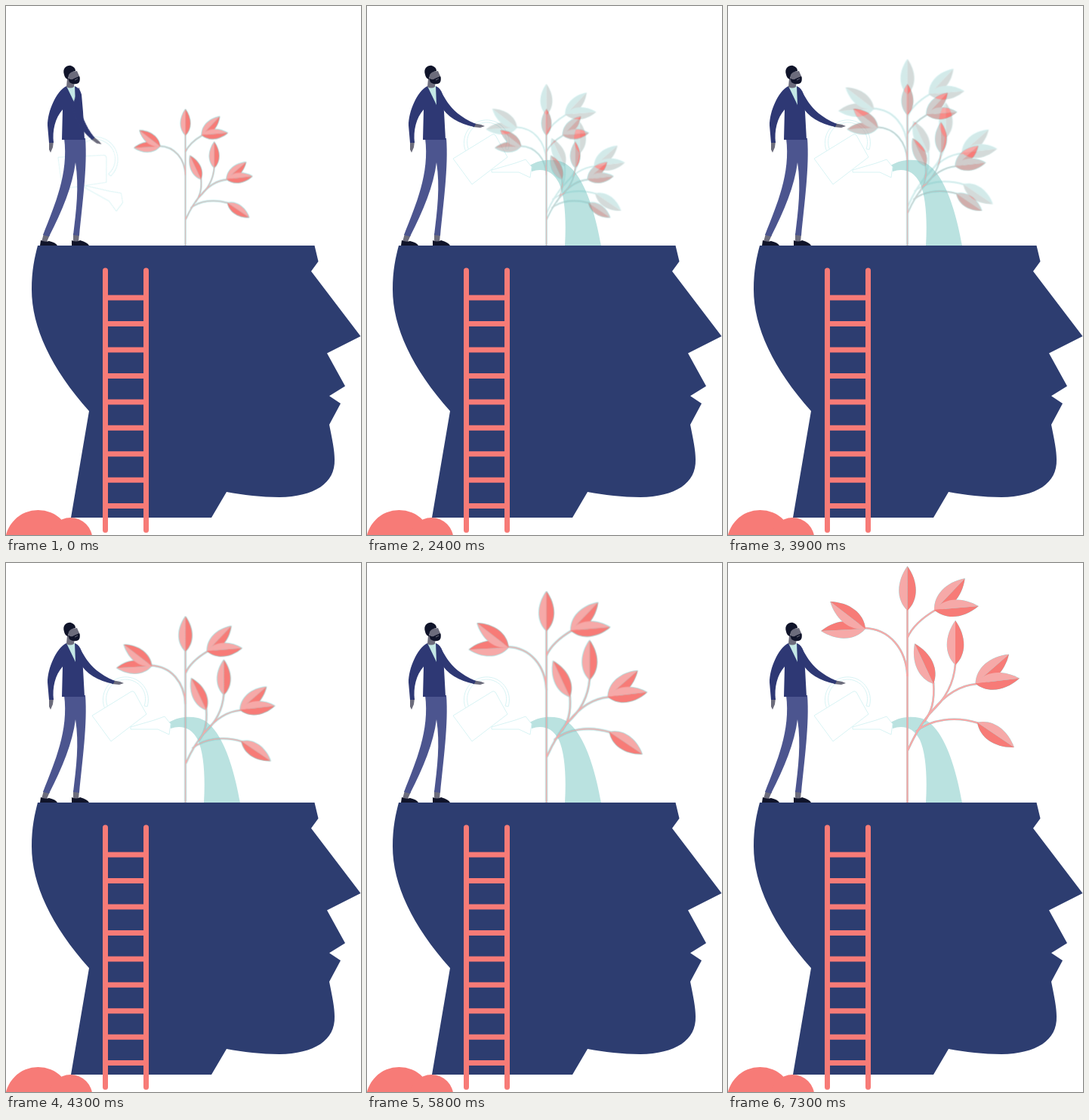
Write an HTML page that moves like this. It is 470 px wide and 700 px high and loops after 8000 ms.

```html
<!DOCTYPE html>
<html lang="en">
<head>
<meta charset="utf-8">
<title>Growing mind</title>
<style>
  :root { --navy: #2d3d70; --coral: #f77b77; --pink: #f6a9a8; --skin: #6c6c7c; --ink: #10142a; }
  html, body { margin: 0; width: 100%; height: 100%; overflow: hidden; background: #fff; }
  svg { display: block; width: 470px; height: 700px; }

  .pour { transform-origin: 95px 114px; animation: pour 8s steps(2, start) infinite; }
  .water { fill: #bae2e0; animation: water 8s step-end infinite; }
  .can { fill: #fff; stroke: #d8f3f4; stroke-width: 1; stroke-linejoin: round; }
  .branch { fill: none; stroke: var(--pink); stroke-width: 2.6; }

  /* Each tree size dissolves into the next in six steps */
  .trees { isolation: isolate; filter: url(#ash); }
  .trees use {
    transform-origin: 237.5px 334px;
    transform: scale(var(--s));
    mix-blend-mode: plus-lighter;
    animation: var(--fade) 8s steps(6, start) infinite;
  }
  .t1 { --s: .6; --fade: size1; }
  .t2 { --s: .7; --fade: size2; }
  .t3 { --s: .8; --fade: size3; }
  .t4 { --s: .9; --fade: size4; }
  .t5 { --s: 1; --fade: size5; }

  @keyframes pour { 0%, 6.25% { transform: rotate(29deg); } 8.75%, 100% { transform: rotate(0deg); } }
  @keyframes water { 0% { opacity: 0; } 16.25%, 100% { opacity: 1; } }
  @keyframes size1 { 0%, 28.75% { opacity: 1; } 36.25%, 100% { opacity: 0; } }
  @keyframes size2 { 0%, 28.75% { opacity: 0; } 36.25%, 47.5% { opacity: 1; } 55%, 100% { opacity: 0; } }
  @keyframes size3 { 0%, 47.5% { opacity: 0; } 55%, 66.25% { opacity: 1; } 73.75%, 100% { opacity: 0; } }
  @keyframes size4 { 0%, 66.25% { opacity: 0; } 73.75%, 85% { opacity: 1; } 92.5%, 100% { opacity: 0; } }
  @keyframes size5 { 0%, 85% { opacity: 0; } 92.5%, 100% { opacity: 1; } }
</style>
</head>
<body>
<svg viewBox="0 0 470 700">
  <defs>
    <!-- Half-transparent parts turn grey, solid parts keep their colour -->
    <filter id="ash" filterUnits="userSpaceOnUse" x="0" y="0" width="470" height="340" color-interpolation-filters="sRGB">
      <feColorMatrix values="1 0 0 .72 -.72  0 1 0 -.13 .13  0 0 1 -.13 .13  0 0 0 1 0"/>
    </filter>
    <g id="leaf">
      <path fill="#f6a9a8" d="M0 0C14-15 38-15 59 0Z"/>
      <path fill="#f77b77" d="M0 0C14 15 38 15 59 0Z"/>
    </g>
    <g id="tree">
      <g class="branch">
        <path d="M237.5 60V334"/>
        <path d="M237.5 150C236 114 214 87 180 86"/>
        <path d="M237.5 99C244 84 258 72 275 62"/>
        <path d="M238 248C247 228 256 211 270 196C286 176 305 162 329 160"/>
        <path d="M249 223C268 207 300 202 332 212"/>
        <path d="M272 158C274 184 269 197 260 210"/>
        <path d="M301 134C299 160 286 182 268 198"/>
      </g>
      <use href="#leaf" transform="translate(237.5 63) rotate(-90)"/>
      <use href="#leaf" transform="translate(273 63) rotate(-46.4)"/>
      <use href="#leaf" transform="translate(273 62) rotate(-4.8)"/>
      <use href="#leaf" transform="translate(182 87) rotate(177)"/>
      <use href="#leaf" transform="translate(182 87) rotate(-142.5)"/>
      <use href="#leaf" transform="translate(272 160) rotate(-115)"/>
      <use href="#leaf" transform="translate(301 135) rotate(-90)"/>
      <use href="#leaf" transform="translate(327.5 159.5) rotate(-41)"/>
      <use href="#leaf" transform="translate(327.5 159.5) rotate(-6.7)"/>
      <use href="#leaf" transform="translate(330 211) rotate(34)"/>
    </g>
  </defs>

  <path class="water" d="M215 211C227 204 241 202 254 205C285 212 302 272 310 317H262C264 282 262 252 254 234C246 218 232 214 218 219Z"/>

  <g class="can pour">
    <path d="M131 193A30 30 0 1 1 187 190L183 189A26 26 0 1 0 135 191Z"/>
    <path d="M165 217L196 208L210 203L218 213L216 227L201 220L165 220Z"/>
    <path d="M114 202L166 170Q168 169 170 171L186 200L139 236Z"/>
  </g>

  <g class="trees">
    <use class="t1" href="#tree"/>
    <use class="t2" href="#tree"/>
    <use class="t3" href="#tree"/>
    <use class="t4" href="#tree"/>
    <use class="t5" href="#tree"/>
  </g>

  <!-- Gardener -->
  <g>
    <path fill="var(--skin)" d="M50 301L47 312H54L58 303ZM89 301V312H96L97 302Z"/>
    <path fill="var(--ink)" d="M46 310Q52 313 57 311Q66 313 68 317H45ZM87 310Q93 313 98 310Q108 313 110 317H87Z"/>
    <path fill="#4c558f" d="M77 175H105C108 212 101 262 97 304L89 303C93 270 97 240 92 207C88 238 75 270 57 305L49 303C65 262 83 222 77 175Z"/>
    <path fill="var(--skin)" d="M57 179H63L62 187L59 194L57 190Z"/>
    <path fill="#2e3874" d="M80 106C66 113 55 140 55 158L57 181H63C61 165 65 148 75 137L74 177H104L102 140L100 117Q98 109 91 106Z"/>
    <path fill="#c4e8e6" d="M80 106L91 106L92 131Z"/>
    <path fill="var(--skin)" d="M81 96H91L90 107Q85 110 80 107Z"/>
    <path fill="var(--skin)" d="M81 88L94 86L98 95L94 102L84 100Z"/>
    <path fill="var(--ink)" d="M77 91C74 82 81 78 86 79Q92 81 92 86Q85 87 83 91L82 97Q78 96 77 91Z"/>
    <path fill="var(--ink)" d="M82 95Q86 99 90 96L97 93Q99 99 96 102Q90 105 84 101Z"/>
    <path fill="none" stroke="var(--skin)" d="M91 98L95 96"/>
  </g>
  <g class="pour">
    <path fill="var(--skin)" d="M140 155L151 157L156 159L150 161L140 160Z"/>
    <path fill="#2e3874" d="M93 108C102 112 103 139 144 156L142 160C122 156 106 147 97 131Z"/>
  </g>

  <!-- Head, ladder and bush -->
  <path fill="var(--navy)" d="M42 317H408.5L413.5 338L404 351L469.5 437L425 459.5L449 503L428 516L443 526L428 554C432 574 435 588 435 600C436 632 408 649 362 650C338 650 314 647 292 643L272 677H86L110 536C60 480 34 425 34 375C34 350 38 332 42 317Z"/>
  <g fill="none" stroke="var(--coral)" stroke-width="7">
    <path stroke-linecap="round" d="M131.5 350V693.5M185.5 350V693.5"/>
    <path d="M131 386h55m-55 34.5h55m-55 34.4h55m-55 34.5h55m-55 34.5h55m-55 34.4h55m-55 34.5h55m-55 34.4h55m-55 34.4h55"/>
  </g>
  <g fill="var(--coral)">
    <circle cx="42.5" cy="711" r="44"/>
    <circle cx="85.5" cy="706" r="29"/>
  </g>
</svg>
</body>
</html>
```
